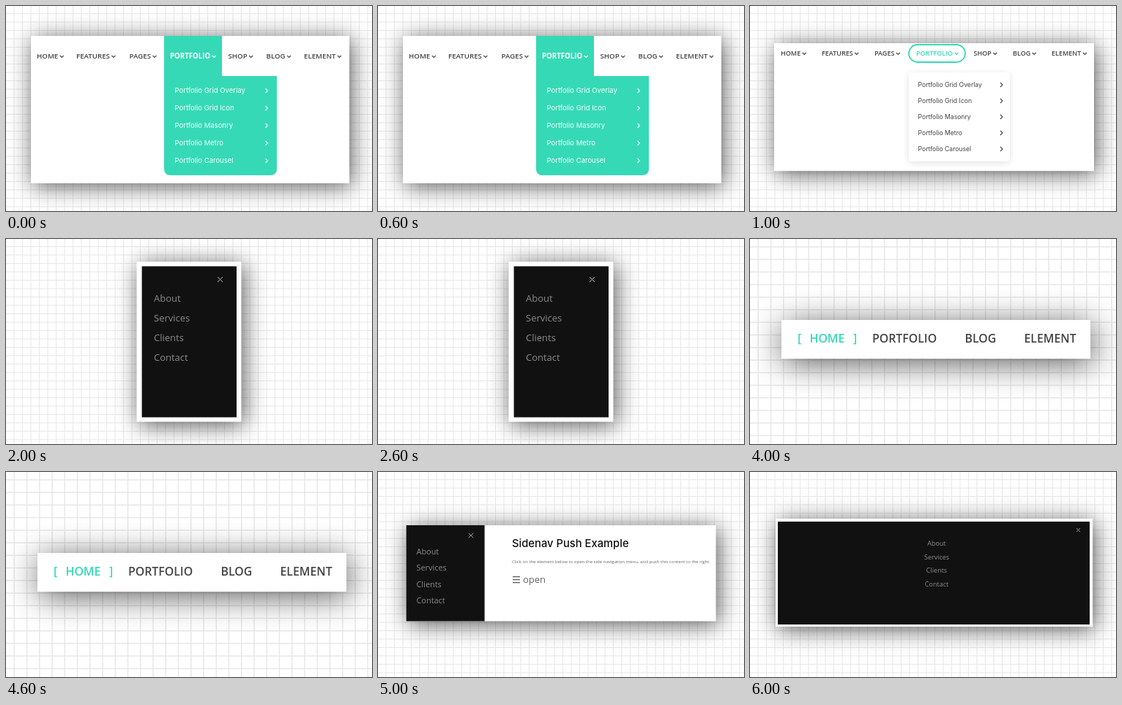
Recreate the animation shown at these times as an HTML page with a canvas. Size 500 by 281 pixels, loop 7 s.

```html
<!DOCTYPE html>
<html lang="en">
<head>
<meta charset="utf-8">
<title>Menu styles</title>
<style>
  html, body { margin: 0; width: 100%; height: 100%; overflow: hidden; background: #fff; }
  canvas { display: block; }
</style>
</head>
<body>
<canvas id="stage" width="500" height="281"></canvas>
<script>
const ctx = document.getElementById('stage').getContext('2d');
const W = 500, H = 281, HOLD = 1000;
const TEAL = '#36d9b6', DARK = '#111', INK = '#444';
const SANS = '"Open Sans", "Noto Sans", sans-serif';
const GEO = 'Inter, Roboto, sans-serif';
const MENU = ['HOME', 'FEATURES', 'PAGES', 'PORTFOLIO', 'SHOP', 'BLOG', 'ELEMENT'];
const DROPDOWN = ['Grid Overlay', 'Grid Icon', 'Masonry', 'Metro', 'Carousel'].map(s => 'Portfolio ' + s);
const SIDENAV = ['About', 'Services', 'Clients', 'Contact'];

function rect(x, y, w, h, color) {
  ctx.fillStyle = color;
  ctx.fillRect(x, y, w, h);
}

function rounded(x, y, w, h, radii, color) {
  ctx.beginPath();
  ctx.roundRect(x, y, w, h, radii);
  ctx.fillStyle = color;
  ctx.fill();
}

function line(points, color, width) {
  ctx.beginPath();
  points.forEach(([x, y]) => ctx.lineTo(x, y));
  ctx.strokeStyle = color;
  ctx.lineWidth = width;
  ctx.stroke();
}

// y is the middle of the capitals; returns the text width.
function text(str, x, y, size, color, { weight = 400, family = SANS, align = 'left' } = {}) {
  ctx.font = `${weight} ${size}px ${family}`;
  ctx.textAlign = align;
  ctx.fillStyle = color;
  ctx.fillText(str, x, y + size * 0.36);
  return ctx.measureText(str).width;
}

function grid(zoom = 1) {
  const step = 11.5 * zoom, color = '#e8e8e8';
  rect(0, 0, W, H, '#fff');
  for (let x = 10.5; x < W; x += step) rect(x, 0, zoom, H, color);
  for (let y = 10; y < H; y += step) rect(0, y, W, zoom, color);
}

function panel(x, y, w, h, zoom = 1) {
  grid(zoom);
  ctx.save();
  ctx.shadowColor = 'rgba(0,0,0,.65)';
  ctx.shadowBlur = 30 * zoom;
  ctx.shadowOffsetX = 3;
  ctx.shadowOffsetY = 4 * zoom;
  rect(x, y, w, h, '#fff');
  ctx.restore();
}

function cross(x, y, size, color = '#999') {
  const r = size / 2;
  line([[x - r, y - r], [x + r, y + r]], color, 1);
  line([[x + r, y - r], [x - r, y + r]], color, 1);
}

function menuBar(xs, y, size, activeColor, activeWeight = 600) {
  MENU.forEach((label, i) => {
    const active = label === 'PORTFOLIO';
    const color = active ? activeColor : INK;
    const end = xs[i] + text(label, xs[i], y, size, color, { weight: active ? activeWeight : 600 });
    line([[end + 2.5, y - 1], [end + 5, y + 1.5], [end + 7.5, y - 1]], color, 1.1);
  });
}

function dropdown(x, y, step, size, color, arrowX) {
  DROPDOWN.forEach((label, i) => {
    const cy = y + i * step;
    text(label, x, cy, size, color, { family: GEO });
    line([[arrowX - 1.5, cy - 3], [arrowX + 1.5, cy], [arrowX - 1.5, cy + 3]], color, 1.1);
  });
}

function sidenav(x, y, step, size, align = 'left') {
  SIDENAV.forEach((label, i) => text(label, x, y + i * step, size, '#8a8a8a', { align }));
}

function tealBlock() {
  panel(34, 41, 435, 202);
  rect(216, 41, 79, 56, TEAL);
  rounded(216, 96, 154, 136, [0, 0, 8, 8], TEAL);
  menuBar([42, 96, 168.5, 224, 303.5, 355.5, 407], 69, 9.7, '#fff', 700);
  dropdown(230.5, 116, 24, 9.5, '#f2fffc', 356);
}

function pill() {
  panel(33, 51, 437, 175);
  ctx.beginPath();
  ctx.roundRect(217, 53, 77, 24, 12);
  ctx.strokeStyle = TEAL;
  ctx.lineWidth = 1.8;
  ctx.stroke();
  ctx.save();
  ctx.shadowColor = 'rgba(0,0,0,.12)';
  ctx.shadowBlur = 10;
  ctx.shadowOffsetY = 2;
  rounded(217, 91, 138, 122, 4, '#fff');
  ctx.restore();
  menuBar([42, 98, 170, 227, 305.5, 359, 412], 65, 9, TEAL);
  dropdown(229.5, 108, 22, 8.65, INK, 343.5);
}

function darkSidebar() {
  panel(178.5, 31, 143, 219.5);
  rect(185.6, 37.4, 129.4, 207, DARK);
  cross(292.5, 55.5, 7, '#bbb');
  sidenav(202, 81.5, 27, 13);
}

function darkDropdown() {
  panel(33, 46, 439, 182);
  rect(227, 62, 60, 6, '#c8f4ea');
  rounded(218, 88, 144.5, 128, [0, 0, 7, 7], '#232323');
  menuBar([44, 99, 171.5, 228, 306.5, 359, 411.5], 61.5, 9.3, TEAL);
  dropdown(232, 106.5, 22.75, 8.85, '#aaa', 350);
}

function brackets() {
  const style = { weight: 600 }, y = 136.5, size = 15.85;
  panel(43, 111, 422, 53, 1.5);
  text('[', 65, y, size, TEAL, style);
  text('HOME', 81.5, y, size, TEAL, style);
  text(']', 141, y, size, TEAL, style);
  text('PORTFOLIO', 167, y, size, INK, style);
  text('BLOG', 293.5, y, size, INK, style);
  text('ELEMENT', 374.5, y, size, INK, style);
}

function pushContent() {
  panel(38.6, 73, 423, 131.5);
  rect(38.6, 73, 107, 131.5, DARK);
  cross(127, 87, 6.5);
  sidenav(52.5, 109, 22.4, 10.9);
  text('Sidenav Push Example', 183, 97.5, 14.75, '#111', { weight: 500, family: GEO });
  text('Click on the element below to open the side navigation menu, and push this content to the right.',
    183, 123, 6.05, '#666');
  for (let i = 0; i < 3; i++) rect(184, 143 + i * 4, 10, 1.2, '#555');
  text('open', 198, 147.5, 13, '#666');
}

function overlay() {
  panel(35, 64, 433, 148);
  rect(38, 68, 426, 141, DARK);
  cross(448.5, 79.5, 5);
  sidenav(255, 98, 18.5, 9, 'center');
}

const scenes = [tealBlock, pill, darkSidebar, darkDropdown, brackets, pushContent, overlay];
let start;

function frame(now) {
  start ??= now;
  const index = Math.floor((now - start) / HOLD) % scenes.length;
  scenes[index]();
  requestAnimationFrame(frame);
}
requestAnimationFrame(frame);
</script>
</body>
</html>
```
